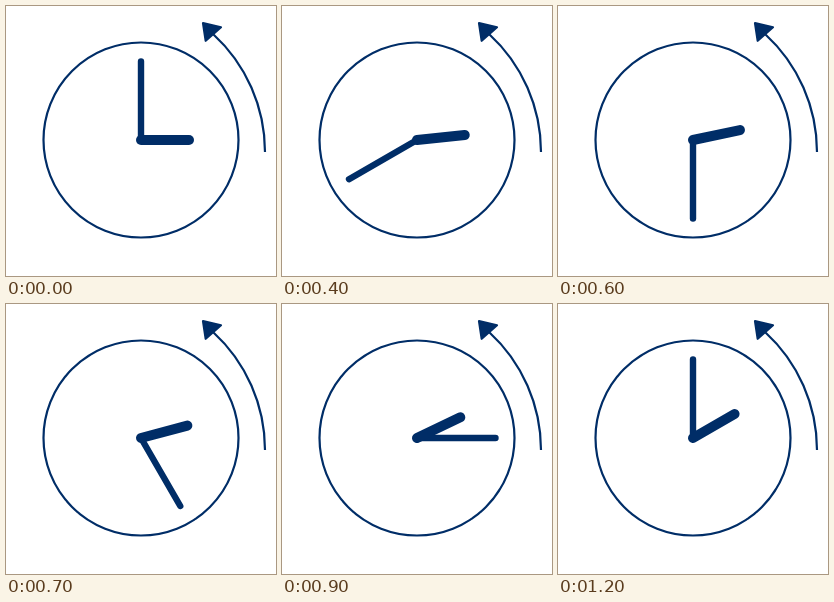
Animation of 270 by 270 pixels, one loop 2200 ms. Source, as an HTML page:

```html
<!DOCTYPE html>
<html lang="en">
<head>
<meta charset="utf-8">
<title>Clock turning back one hour</title>
<style>
  html, body { margin: 0; width: 100%; height: 100%; overflow: hidden; background: #fff; }
  svg { display: block; width: 100%; height: 100%; }
</style>
</head>
<body>
<svg viewBox="0 0 270 270" fill="none" stroke="#002d67" stroke-width="2.2">
  <circle cx="135" cy="134" r="97.5"/>
  <path d="M259 146 A160 160 0 0 0 207 28"/>
  <path d="M197 17 L215 21.3 L199.7 34.8 Z" fill="#002d67" stroke-linejoin="round"/>
  <g stroke-linecap="round">
    <path id="minute" d="M135 134 V55.5" stroke-width="6.4"/>
    <path id="hour" d="M135 134 H183" stroke-width="10"/>
  </g>
</svg>
<script>
  const LOOP = 2200, STEP = 100, LAST_STEP = 12;
  // Backward turn of the hour hand: [step, degrees], linear in between.
  const hourKeys = [[0, 0], [4, 6], [7, 15], [9, 25.5], [12, 30]];
  const minute = document.getElementById('minute');
  const hour = document.getElementById('hour');

  function hourAngle(step) {
    const next = Math.max(1, hourKeys.findIndex(([s]) => s >= step));
    const [s0, a0] = hourKeys[next - 1];
    const [s1, a1] = hourKeys[next];
    return a0 + (a1 - a0) * (step - s0) / (s1 - s0);
  }

  function turnBack(hand, degrees) {
    hand.setAttribute('transform', `rotate(${-degrees} 135 134)`);
  }

  let start;
  function draw(now) {
    start ??= now;
    const step = Math.min(LAST_STEP, Math.floor((now - start) % LOOP / STEP));
    turnBack(minute, step * 30);
    turnBack(hour, hourAngle(step));
    requestAnimationFrame(draw);
  }
  requestAnimationFrame(draw);
</script>
</body>
</html>
```
